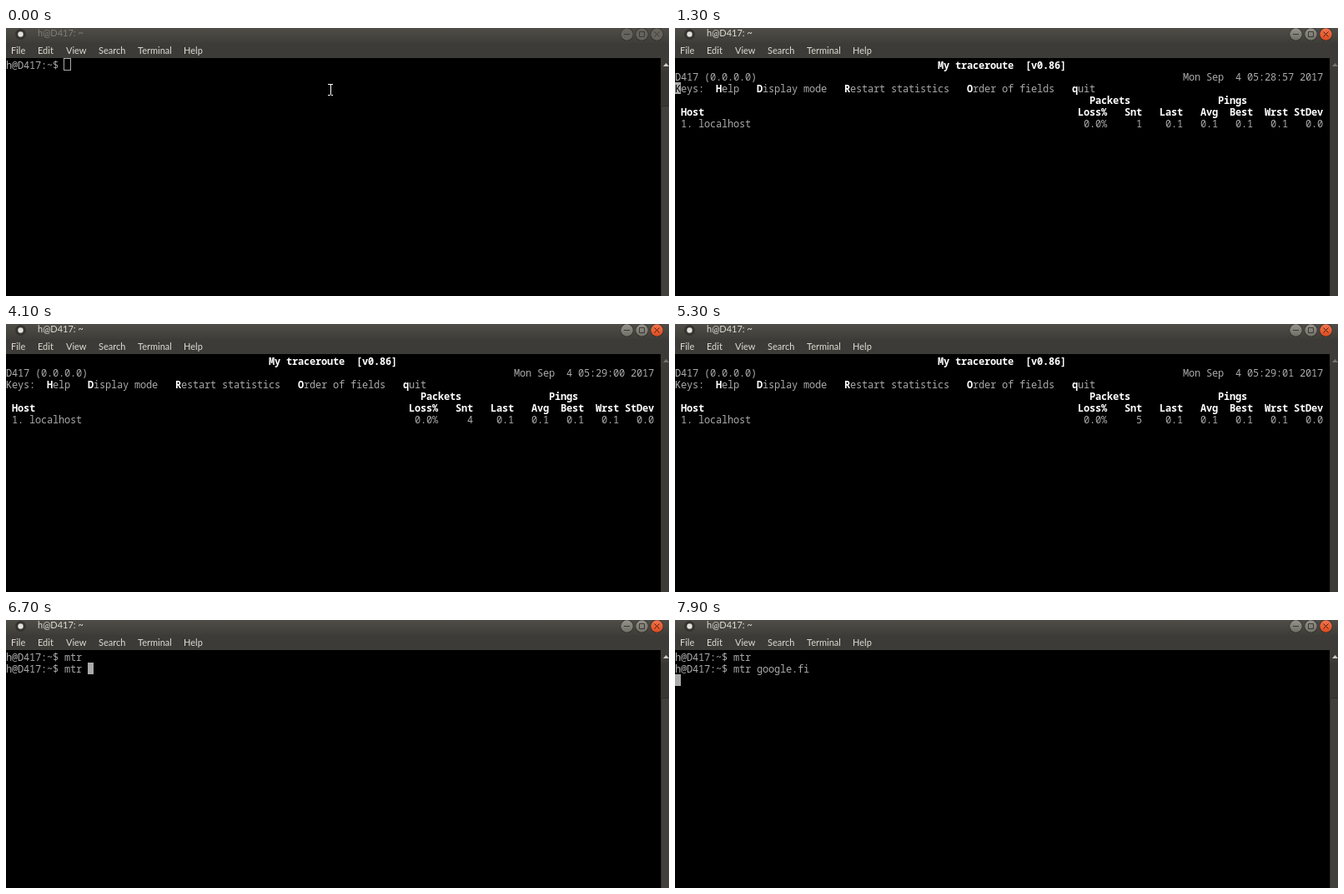
Animation of 795 by 321 pixels, one loop 8 s. Source, as an HTML page with a canvas:

```html
<!DOCTYPE html>
<html lang="en">
<head>
<meta charset="utf-8">
<title>Terminal</title>
<style>
html, body { margin: 0; width: 100%; height: 100%; overflow: hidden; background: #000; }
canvas { display: block; width: 795px; height: 321px; }
</style>
</head>
<body>
<canvas id="stage" width="795" height="321"></canvas>
<script>
const ctx = document.getElementById('stage').getContext('2d');
const LOOP = 8000, CELL = 7, LINE = 14, TOP = 37;
const MONO = '12px "Noto Sans Mono", monospace';
const SANS = '11px Lato, "Open Sans", sans-serif';
const GRAY = '#aaa', WHITE = '#fff', PALE = '#dfdbd2';
const HOST = 'D417', WHO = 'h@' + HOST, PROMPT = WHO + ':~$ ';

const FIRST = { text: 'mtr', at: [500, 800, 1000] };
const SECOND = {
  text: 'mtr google.fi',
  at: [6200, 6400, 6600, 6700, 6800, 6900, 7100, 7200, 7300, 7400, 7500, 7600, 7700]
};
const typed = (line, t) => line.text.slice(0, line.at.filter(k => k <= t).length);

function rect(x, y, w, h, color) {
  ctx.fillStyle = color;
  ctx.fillRect(x, y, w, h);
}

function disc(x, y, r, color) {
  ctx.fillStyle = color;
  ctx.beginPath();
  ctx.arc(x, y, r, 0, Math.PI * 2);
  ctx.fill();
}

function vertical(y, h, from, to) {
  const g = ctx.createLinearGradient(0, y, 0, y + h);
  g.addColorStop(0, from);
  g.addColorStop(1, to);
  return g;
}

// Terminal text sits on a fixed character grid.
function put(col, row, text, color = GRAY, bold = false) {
  ctx.font = (bold ? 'bold ' : '') + MONO;
  ctx.fillStyle = color;
  [...text].forEach((ch, i) => {
    if (ch !== ' ') ctx.fillText(ch, (col + i) * CELL, TOP + row * LINE + 12);
  });
}

const strong = (col, row, text) => put(col, row, text, WHITE, true);

function block(col, row) {
  rect(col * CELL, TOP + row * LINE, CELL, LINE, GRAY);
}

function label(x, y, text, color) {
  ctx.font = SANS;
  ctx.fillStyle = color;
  ctx.fillText(text, x, y);
}

function button(x, fill, ink, icon) {
  disc(x, 7.5, 8, '#33322e');
  disc(x, 7.5, 7.2, fill);
  ctx.strokeStyle = ink;
  ctx.lineWidth = 1;
  ctx.beginPath();
  if (icon === 'min') {
    ctx.moveTo(x - 3.5, 7.5);
    ctx.lineTo(x + 3.5, 7.5);
  } else if (icon === 'max') {
    ctx.rect(x - 3, 4.5, 6, 6);
  } else {
    ctx.moveTo(x - 3, 4.5);
    ctx.lineTo(x + 3, 10.5);
    ctx.moveTo(x + 3, 4.5);
    ctx.lineTo(x - 3, 10.5);
  }
  ctx.stroke();
}

function chrome(active) {
  rect(0, 0, 795, 18, vertical(0, 18, '#4f4d47', '#3e3d39'));
  rect(0, 18, 795, 18, '#3c3b37');
  disc(17.5, 7.5, 6.5, '#353430');
  disc(17.5, 7.5, 3.2, '#e4e1da');
  label(38, 10, WHO + ': ~', active ? PALE : '#807d76');

  const fill = active ? vertical(0, 15, '#96938a', '#706e67') : '#65635c';
  const ink = active ? '#3a3935' : '#3b3a36';
  button(744.5, fill, ink, 'min');
  button(762.5, fill, ink, 'max');
  button(780.5, active ? vertical(0, 15, '#f2764f', '#dd4a1c') : fill,
    active ? '#4b2012' : ink, 'close');

  [['File', 6], ['Edit', 38], ['View', 72], ['Search', 111], ['Terminal', 158], ['Help', 213]]
    .forEach(([name, x]) => label(x, 31, name, PALE));
}

function scrollbar(full) {
  rect(785, 36, 10, 285, '#3c3b37');
  ctx.fillStyle = full ? '#77746c' : '#d0ccc3';
  ctx.beginPath();
  ctx.moveTo(788, 46);
  ctx.lineTo(791.5, 42);
  ctx.lineTo(795, 46);
  ctx.fill();
  rect(785, 50, 1, 271, '#33322e');
  if (full) return;
  rect(786, 51, 9, 42, '#383733');
  ctx.fillStyle = '#42413c';
  ctx.strokeStyle = '#2c2b28';
  ctx.lineWidth = 1;
  ctx.beginPath();
  ctx.roundRect(785.5, 93.5, 14, 240, 3);
  ctx.fill();
  ctx.stroke();
}

function pointer(x, y) {
  rect(x, y, 1, 13, WHITE);
  rect(x - 3, y, 3, 1, WHITE);
  rect(x + 1, y, 2, 1, WHITE);
  rect(x - 3, y + 13, 3, 1, WHITE);
  rect(x + 1, y + 13, 2, 1, WHITE);
}

function trace(t) {
  const sent = 1 + Math.max(0, Math.floor((t - 900) / 1000));
  const sec = 56 + sent;
  const clock = '05:' + (28 + Math.floor(sec / 60)) + ':' + String(sec % 60).padStart(2, '0');

  strong(45, 0, 'My traceroute  [v0.86]');
  put(0, 1, HOST + ' (0.0.0.0)');
  put(87, 1, 'Mon Sep  4 ' + clock + ' 2017');

  const lit = t < 1700 || Math.floor((t - 1700) / 600) % 2 === 1;
  if (lit) block(0, 2);
  put(0, 2, 'K', lit ? '#000' : GRAY);
  put(1, 2, 'eys:');
  [[7, 'Help'], [14, 'Display mode'], [29, 'Restart statistics'],
    [50, 'Order of fields'], [68, 'quit']].forEach(([col, name]) => {
    strong(col, 2, name[0]);
    put(col + 1, 2, name.slice(1));
  });

  strong(71, 3, 'Packets');
  strong(93, 3, 'Pings');
  strong(1, 4, 'Host');
  put(1, 5, '1. localhost');
  [['Loss%', '0.0%', 74], ['Snt', String(sent), 80], ['Last', '0.1', 87], ['Avg', '0.1', 93],
    ['Best', '0.1', 99], ['Wrst', '0.1', 105], ['StDev', '0.0', 111]].forEach(([head, val, end]) => {
    strong(end - head.length, 4, head);
    put(end - val.length, 5, val);
  });
}

function shell(t) {
  const first = typed(FIRST, t);
  put(0, 0, PROMPT + first);
  if (t < 300) {
    ctx.strokeStyle = GRAY;
    ctx.lineWidth = 1;
    ctx.strokeRect(69.5, TOP - 0.5, 8, LINE);
  } else if (t < 1200) {
    block(PROMPT.length + first.length, 0);
  } else if (t < 1300) {
    block(0, 1);
  } else {
    const second = typed(SECOND, t);
    put(0, 1, PROMPT + second);
    if (t >= 7900) block(0, 2);
    else if (t < 6000 || t >= 6200) block(PROMPT.length + second.length, 1);
  }
  if (t < 500) pointer(389, 67);
  else if (t >= 5600 && t < 6200) {
    const p = Math.min(1, Math.floor((t - 5600) / 100) / 4);
    pointer(388, Math.round(62 - 2 * p));
  }
}

function draw(t) {
  const tracing = t >= 1300 && t < 5400;
  rect(0, 0, 795, 321, '#000');
  chrome(t >= 200);
  scrollbar(tracing);
  if (tracing) trace(t);
  else shell(t);
}

const start = performance.now();
function tick() {
  draw((performance.now() - start) % LOOP);
  requestAnimationFrame(tick);
}
tick();
</script>
</body>
</html>
```
